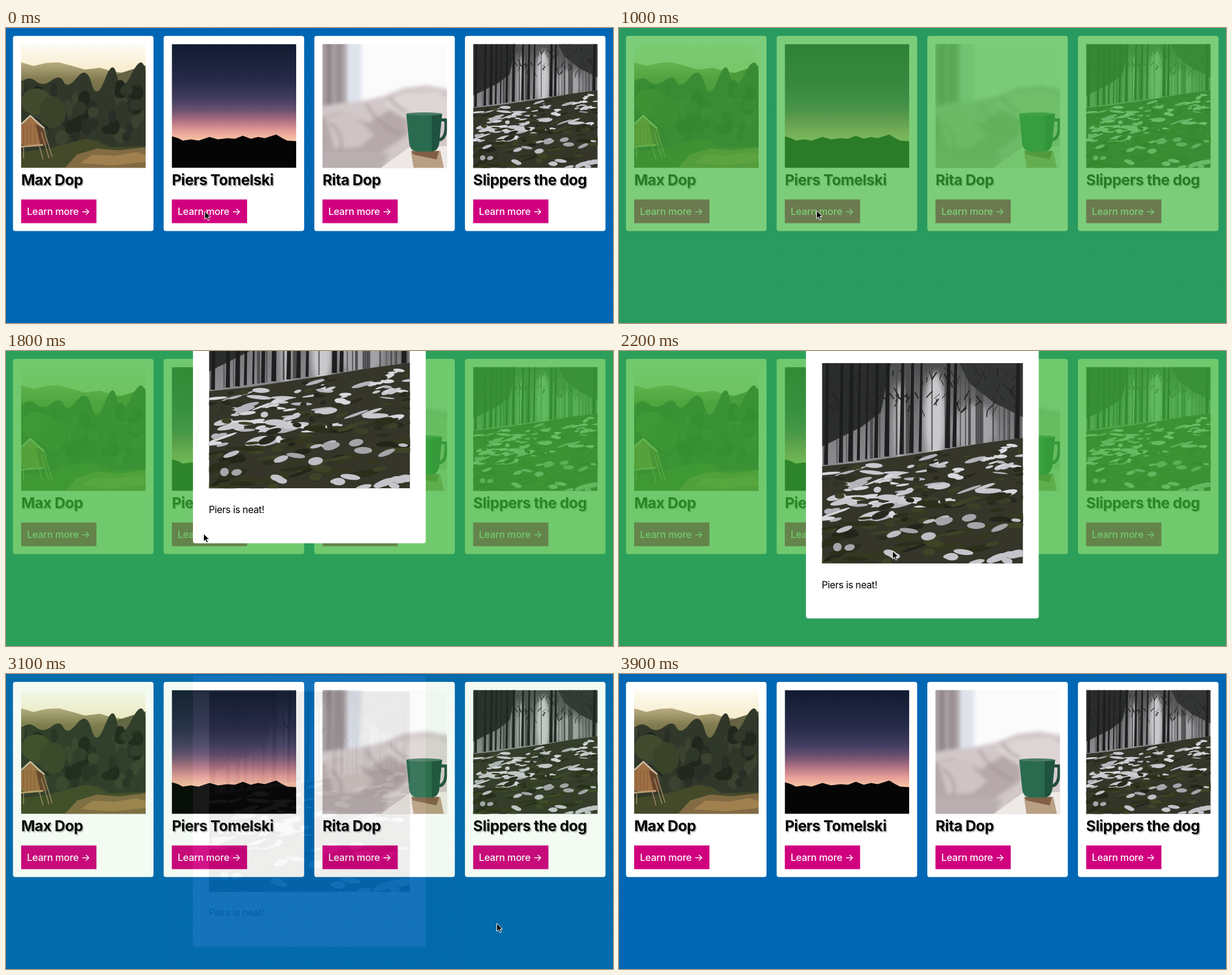
Write an HTML page that moves like this. It is 1000x486 px and loops after 4000 ms.

```html
<!DOCTYPE html>
<html lang="en">
<head>
<meta charset="utf-8">
<title>Cards with a modal</title>
<style>
  html, body { margin: 0; width: 100%; height: 100%; overflow: hidden; background: #0067b4; }
  svg { display: block; font-family: Inter, sans-serif; }
  .name { font-size: 24.5px; font-weight: 700; letter-spacing: -.49px; text-shadow: 1.7px 1.7px 0 rgba(0,0,0,.25); }
  .more { font-size: 16px; font-weight: 500; letter-spacing: -.2px; fill: #fff; }
  .note { font-size: 16px; letter-spacing: -.4px; }
</style>
</head>
<body>
<svg id="stage" width="1000" height="486" viewBox="0 0 1000 486"></svg>
<script>
const stage = document.getElementById('stage');

let seed = 11;
const random = (a = 0, b = 1) => {
  seed = (seed * 16807) % 2147483647;
  return a + (b - a) * seed / 2147483647;
};
const repeat = (n, make) => Array.from({ length: n }, (_, i) => make(i)).join('');

const gradient = (id, ...stops) => `<linearGradient id="${id}" x2="0" y2="1">${
  stops.map(([at, color]) => `<stop offset="${at}" stop-color="${color}"/>`).join('')}</linearGradient>`;
const shape = (fill, points, extra = '') => `<path fill="${fill}" d="M${points}z" ${extra}/>`;
const line = (color, width, points) => `<path fill="none" stroke="${color}" stroke-width="${width}" d="M${points}"/>`;
const blob = (fill, x, y, rx, ry, tilt = 0) =>
  `<ellipse fill="${fill}" rx="${rx}" ry="${ry}" transform="translate(${x} ${y}) rotate(${tilt})"/>`;
const photo = (id, content) => `<symbol id="${id}" viewBox="0 0 205 204" preserveAspectRatio="none">${content}</symbol>`;
const sheet = fill => `<rect width="205" height="204" fill="${fill}"/>`;

function cabin() {
  const tree = () => {
    const x = random(0, 205), y = random(70, 155);
    return blob(['#20271d', '#30382a', '#3a4230', '#292f26'][Math.floor(random(0, 4))], x, y, random(5, 11), random(7, 14));
  };
  return sheet('url(#haze)') +
    shape('url(#hills)', '0 30L20 36 42 31 62 30 84 36 105 42 130 39 150 45 165 47 205 60V120H0') +
    shape('#656344', '140 60L160 49 182 42 205 35V90H140') +
    shape('#31382a', '0 63Q12 51 24 61T50 60 70 62 92 55 116 65 138 58 158 53 182 49 205 46V180H0') +
    repeat(70, tree) +
    blob('#414a2c', 25, 95, 25, 22) + blob('#3a4329', 52, 112, 22, 26) +
    shape('#434929', '0 178L45 172 80 163 105 156 128 160 145 170 205 168V204H0') +
    shape('#826b43', '72 204L92 182 125 172 160 175 205 170V204') +
    shape('#a1804f', '98 196L118 182 155 184 190 178 205 183V194L150 200') +
    shape('#a07045', '0 134L15 119 38 139 42 164 33 168 0 166') +
    shape('#68442c', '24 132L38 139 43 166 32 168') +
    repeat(4, i => line('#7d5434', .8, `${4 + i * 6} 132V165`)) +
    line('#cdbda2', 2.5, '0 132L15 118 38 139') +
    line('#bd9d72', 3, '0 169L36 166') +
    line('#9a8460', 1.6, '37 140L51 186M33 145L46 188M4 170V188M30 168L36 190');
}

const dusk = () => sheet('url(#sunset)') +
  shape('#050506', '0 152Q10 154 18 159L32 157 44 159 62 153 76 157 92 155 104 156 117 151 130 156 142 153 153 155 172 149 182 155 190 159 205 160V204H0');

const mug = () => sheet('#fcfbfc') +
  `<g filter="url(#soft)">
    <rect x="-9" y="-9" width="50" height="112" fill="#aaa0a3"/>
    <rect x="7" y="-9" width="7" height="112" fill="#857d82"/>
    <rect x="24" y="-9" width="6" height="112" fill="#8e858a"/>
    <rect x="40" y="-9" width="24" height="108" fill="#dfe4ec"/>` +
    shape('#d2c8c9', '-9 104L25 98 62 94 100 86 135 72 172 68 215 76V215H-9') +
    shape('#b7a9a9', '-9 122L30 112 75 130 110 108 140 125 140 150 95 180 -9 180') +
    shape('#cfc4c3', '5 120L45 112 85 150 60 170 20 172') +
    shape('#ded5d5', '100 98L130 82 190 78 210 95 205 130 150 128') +
    line('#a09293', 3, '12 130Q35 145 30 175M72 98Q92 135 128 148M110 88Q126 108 140 112') +
    shape('#b9afb0', '-9 181L110 180 95 215H-9') +
  '</g>' +
  shape('#efe9e6', '96 204L143 170 205 168V204') +
  shape('#b99f83', '150 204L146 178 194 176 200 204') +
  shape('#805f45', '150 182L146 176 192 176 188 190') +
  line('#234e3d', 5, '193 125H203Q206 158 190 158') +
  shape('#2a6b4f', '138 115Q168 111 197 115L192 165Q190 176 180 177H155Q145 176 143 165') +
  shape('#205240', '180 114L197 115 192 165Q190 176 180 177') +
  blob('#4c7d66', 167.5, 115, 29, 2.5);

function forest() {
  const trunks = [[4, 4], [19, 4], [29, 5], [37, 3], [45, 2], [55, 4], [66, 5], [81, 4], [91, 4], [100, 3], [128, 5], [135, 4], [199, 5]];
  const ground = x => 104 - x * .137;
  const patch = (colors, top, bottom, big) => {
    const x = random(0, 205), y = ground(x) + random(top, bottom), near = .6 + (y - 80) / 150;
    return blob(colors[Math.floor(random(0, colors.length))], x, y, random(3, big) * near, random(1, 3.5) * near, random(-22, 8));
  };
  const twig = () => {
    const x = random(0, 205), y = random(0, 50);
    return line('#242525', random(.5, 1.4), `${x} ${y}l${random(-8, 8)} ${random(4, 9)}`);
  };
  return sheet('url(#mist)') +
    `<g filter="url(#soft)">${blob('#c9c9cc', 115, 55, 11, 46) + blob('#b9b9bc', 79, 60, 6, 40) + blob('#a3a3a6', 155, 66, 22, 24)}</g>` +
    repeat(34, () => { const x = random(0, 205); return line('#4c4d4e', random(.6, 2), `${x} 0V${ground(x)}`); }) +
    shape('#2b2c2c', '0 0H70L60 50 40 65 0 85') + shape('#333434', '140 0H205V55L175 40 150 20') +
    repeat(100, twig) +
    trunks.map(([x, w]) => shape('#1d1e1f', `${x - w / 2 + 2} 0h${w * .7}L${x + w / 2} ${ground(x)}h${-w}`)).join('') +
    shape('#35352a', '0 105L40 101 80 95 120 89 160 82 205 76V204H0') +
    repeat(95, () => patch(['#c9c8ce', '#b4b3ba', '#d8d7dc'], 5, 62, 16)) +
    repeat(65, () => patch(['#303122', '#3c4026', '#28281f'], 3, 75, 9)) +
    repeat(55, () => patch(['#2c2e1c', '#3e4426', '#353720', '#24251a'], 55, 112, 16)) +
    repeat(14, () => patch(['#bebdc3', '#a5a4a9'], 68, 90, 8)) +
    repeat(12, () => blob('#c5c4ca', random(60, 205), random(190, 203), random(5, 11), random(1.5, 4), random(-20, 20)));
}

const card = ([name, picture], i) => `<g transform="translate(${11.5 + i * 248.2} 13)">
  <rect width="231.5" height="321.5" rx="4" fill="#fff"/>
  <use href="#${picture}" x="13.5" y="13.5" width="205" height="204"/>
  <text class="name" x="13.5" y="246">${name}</text>
  <rect x="13.5" y="269.5" width="124" height="39" fill="#d0007e"/>
  <text class="more" x="23" y="295">Learn more →</text>
</g>`;

const cards = [['Max Dop', 'cabin'], ['Piers Tomelski', 'dusk'], ['Rita Dop', 'mug'], ['Slippers the dog', 'forest']];

stage.innerHTML = `<defs>
  ${gradient('haze', [0, '#fdfcf3'], [.2, '#f8edcf'])}
  ${gradient('hills', [0, '#b9ad82'], [.3, '#837c51'], [1, '#4a4b31'])}
  ${gradient('sunset', [0, '#111b30'], [.3, '#272b49'], [.45, '#453f62'], [.53, '#69506f'], [.61, '#a76d80'], [.7, '#e59c96'], [.78, '#f8c5a5'])}
  ${gradient('mist', [0, '#4b4c4d'], [.25, '#747577'], [.5, '#8b8b8e'])}
  <filter id="soft"><feGaussianBlur stdDeviation="3"/></filter>
  ${photo('cabin', cabin())}${photo('dusk', dusk())}${photo('mug', mug())}${photo('forest', forest())}
  <pattern id="waves" width="11" height="32" patternUnits="userSpaceOnUse">
    <path d="M3 0Q9 8 5 16T3 32" fill="none" stroke="#005ca6" stroke-opacity=".3"/>
  </pattern>
</defs>
<rect width="1000" height="486" fill="#0067b4"/>
<rect width="1000" height="486" fill="url(#waves)"/>
${cards.map(card).join('')}
<g id="overlay">
  <rect width="1000" height="486" fill="#3db639" fill-opacity=".73"/>
  <g id="modal">
    <rect x="308" width="383.5" height="447" rx="4" fill="#fff"/>
    <use href="#forest" x="334.5" y="26.5" width="331" height="330"/>
    <text class="note" x="334" y="397">Piers is neat!</text>
  </g>
</g>
<path id="cursor" d="M0 0V13L3 10.2 5.2 15 7.5 14 5.3 9.3H9.5z" fill="#000" stroke="#fff"/>`;

const overlay = document.getElementById('overlay');
const modal = document.getElementById('modal');
const cursor = document.getElementById('cursor');

const clamp = x => Math.min(1, Math.max(0, x));
// The CSS "ease" curve, cubic-bezier(.25, .1, .25, 1)
function ease(x) {
  x = clamp(x);
  if (x === 0 || x === 1) return x;
  const bezier = (s, a, b) => 3 * a * s * (1 - s) ** 2 + 3 * b * s * s * (1 - s) + s ** 3;
  let low = 0, high = 1;
  for (let i = 0; i < 24; i++) {
    const mid = (low + high) / 2;
    if (bezier(mid, .25, .25) < x) low = mid; else high = mid;
  }
  return bezier(low, .1, 1);
}
const smooth = x => (x = clamp(x), x * x * (3 - 2 * x));

const LOOP = 4000, STEP = 100, OPEN = 800, CLOSE = 2968;

function draw(t) {
  const fade = ease((t - OPEN) / 300) - ease((t - CLOSE) / 200);
  const slide = ease((t - OPEN) / 2000) - ease((t - CLOSE) / 2000);
  overlay.setAttribute('opacity', fade);
  modal.setAttribute('transform', `translate(0 ${46.5 - 894 * (1 - slide)})`);

  const nudge = smooth((t - 700) / 200), across = smooth((t - 2000) / 600), leave = smooth((t - 3200) / 400);
  const x = 327.5 - 2 * nudge + 483 * across;
  const y = 302 - nudge + 110 * across + 90 * leave;
  cursor.setAttribute('transform', `translate(${x} ${y})`);
}

function tick(now) {
  draw(Math.floor(now % LOOP / STEP) * STEP);
  requestAnimationFrame(tick);
}
draw(0);
requestAnimationFrame(tick);
</script>
</body>
</html>
```
